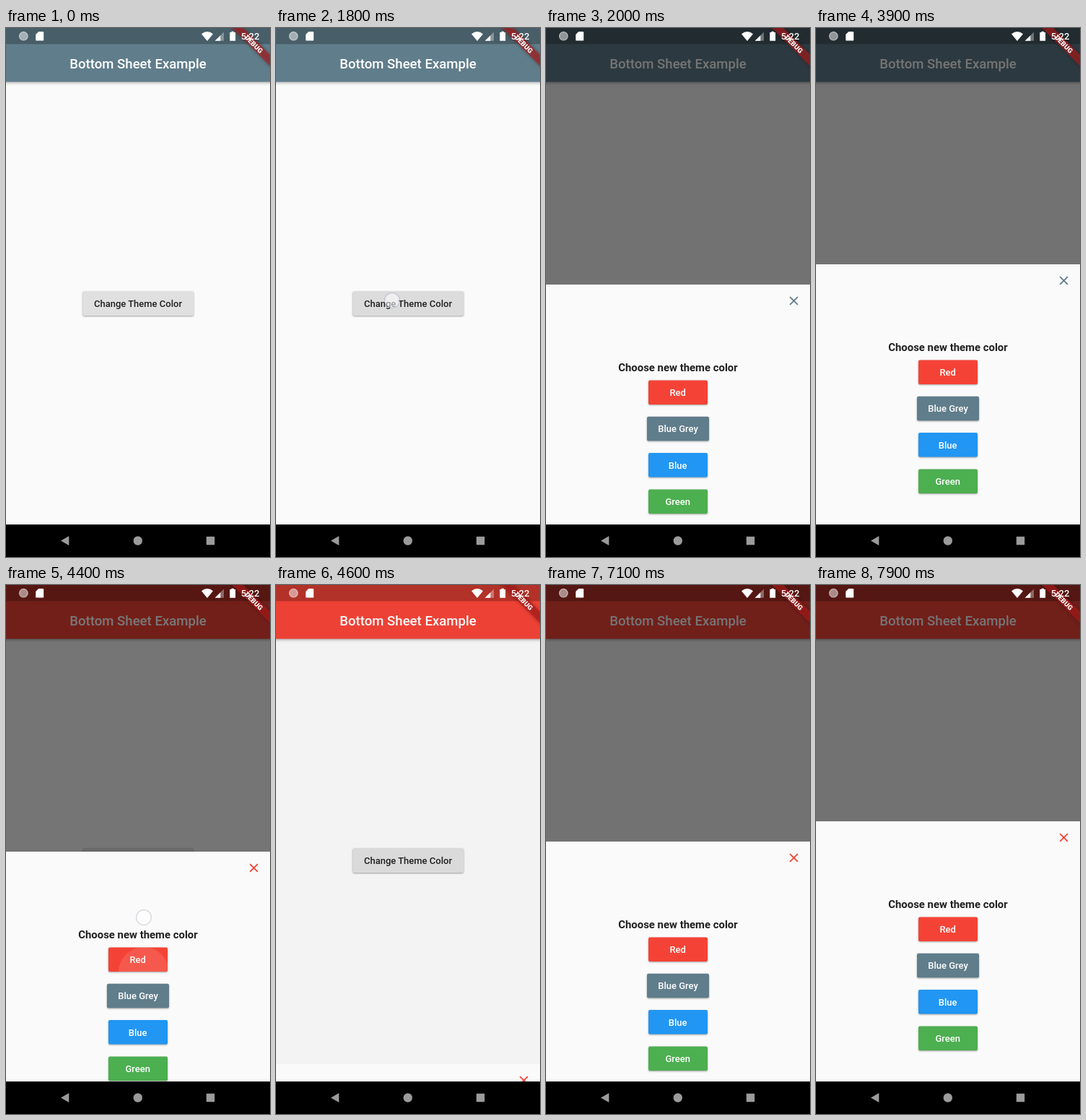
Recreate the animation shown at these times as an HTML page. Size 366 by 732 pixels, loop 8000 ms.

```html
<!DOCTYPE html>
<html lang="en">
<head>
<meta charset="utf-8">
<title>Bottom Sheet Example</title>
<style>
  html, body { margin: 0; width: 100%; height: 100%; overflow: hidden; background: #000; }

  #phone {
    display: block;
    width: 366px;
    height: 732px;
    font: 500 13px Roboto, sans-serif;
    text-anchor: middle;
    animation: demo 8s step-end infinite;
  }

  @keyframes demo {
    0%     { --theme: #607d8b; --drop: 360px; --dim: 0; --tap: 0; --x: 161px; --y: 377px; --button: #e0e0e0; --lift: 2px; --ripple: 0; }
    20%    { --tap: 1; --button: #dcdcdc; }
    23.75% { --drop: 170px; --dim: .3; --tap: 0; --button: #d6d6d6; }
    25%    { --drop: 28px; --dim: .54; --button: #e0e0e0; }
    26.25% { --drop: 0px; }
    53.75% { --theme: #607d8b; --drop: 0px; --dim: .54; --tap: 1; --x: 191px; --y: 460px; --ripple: .06; }
    55%    { --theme: #f44336; --drop: 42px; --dim: .53; --ripple: .11; }
    56.25% { --drop: 222px; --dim: .23; --tap: 0; --ripple: .08; }
    57.5%  { --drop: 336px; --dim: .028; --button: #e0e0e0; --lift: 2px; --ripple: 0; }
    86.25% { --drop: 360px; --dim: 0; --tap: 1; --x: 161px; --y: 386px; --button: #d0d0d0; --lift: 4px; }
    87.5%  { --drop: 170px; --dim: .3; --tap: 0; }
    88.75% { --drop: 28px; --dim: .54; --button: #e0e0e0; --lift: 2px; }
    90%, 100% { --theme: #f44336; --drop: 0px; --dim: .54; --tap: 0; --x: 161px; --y: 386px; --button: #e0e0e0; --lift: 2px; --ripple: 0; }
  }

  .bar { fill: var(--theme); filter: drop-shadow(0 1px 2px rgba(0, 0, 0, .36)); }
  .title { font-size: 18.6px; fill: #fff; }
  .open { fill: var(--button); filter: drop-shadow(0 1px calc(var(--lift) / 2) rgba(0, 0, 0, .36)); }
  .ink { fill: #202020; }
  .barrier { opacity: var(--dim); }
  .sheet { transform: translateY(calc(327px + var(--drop))); }
  .heading { font-size: 14.9px; font-weight: 700; }
  .close { stroke: var(--theme); stroke-width: 1.8; }
  .choices { fill: #fff; }
  .choices rect { filter: drop-shadow(0 1px 1px rgba(0, 0, 0, .36)); }
  .ripple { opacity: var(--ripple); }
  .touch { opacity: var(--tap); transform: translate(var(--x), var(--y)); }
  .ribbon { filter: drop-shadow(0 0 2.5px rgba(0, 0, 0, .5)); }
  .debug { font-size: 9.5px; font-weight: 900; }
</style>
</head>
<body>
<svg id="phone" viewBox="0 0 366 732">
  <defs>
    <clipPath id="redShape"><rect x="142" y="132.5" width="82" height="33.5" rx="2"/></clipPath>
  </defs>

  <rect width="366" height="732" fill="#fafafa"/>
  <rect class="bar" x="-5" y="-5" width="376" height="79.5"/>
  <rect width="366" height="22.3" fill="#000" opacity=".25"/>
  <text class="title" x="183" y="55.6">Bottom Sheet Example</text>

  <rect class="open" x="106.5" y="364.3" width="153.5" height="33.7" rx="2"/>
  <text class="ink" x="183" y="385.6">Change Theme Color</text>

  <rect class="barrier" width="366" height="732"/>

  <g class="sheet">
    <rect width="366" height="420" fill="#fafafa"/>
    <path class="close" d="M338.2 17.1l10.8 10.8m0-10.8l-10.8 10.8"/>
    <text class="heading ink" x="183" y="120.3">Choose new theme color</text>
    <g class="choices">
      <rect x="142" y="132.5" width="82" height="33.5" rx="2" fill="#f44336"/>
      <circle class="ripple" cx="191" cy="167" r="35" clip-path="url(#redShape)"/>
      <text x="182.7" y="154">Red</text>
      <rect x="140" y="182.8" width="86" height="33.5" rx="2" fill="#607d8b"/>
      <text x="183" y="204.3">Blue Grey</text>
      <rect x="142" y="233.1" width="82" height="33.5" rx="2" fill="#2196f3"/>
      <text x="182.7" y="254.6">Blue</text>
      <rect x="142" y="283.4" width="82" height="33.5" rx="2" fill="#4caf50"/>
      <text x="182.7" y="304.9">Green</text>
    </g>
  </g>

  <g transform="translate(366 0) rotate(45)">
    <rect class="ribbon" x="-44" y="26" width="88" height="11.2" fill="#b71c1c" fill-opacity=".63"/>
    <text class="debug" y="35" fill="#fff">DEBUG</text>
  </g>

  <g fill="#fff">
    <circle cx="24.3" cy="11.2" r="5.8" fill-opacity=".5" stroke="#fff" stroke-opacity=".55" stroke-width="1.2"/>
    <path d="M45.2 5H51a1.2 1.2 0 0 1 1.2 1.2v10.2a1.2 1.2 0 0 1-1.2 1.2h-8.6a1.2 1.2 0 0 1-1.2-1.2V9z"/>
    <path d="M271 8.2Q279 2 287 8.2L279 18z"/>
    <path d="M302 5.5V17.8H289.7z" fill-opacity=".35"/>
    <path d="M297.3 10.2V17.8H289.7z"/>
    <path d="M312.5 4.8h3.4v1.3h2.2v11.7h-7.8V6.1h2.2z"/>
    <text x="338.6" y="16.4">5:22</text>
  </g>

  <rect y="687" width="366" height="45"/>
  <g fill="#9b9b9b">
    <path d="M76 709.5l11.3-6.4v12.8z"/>
    <circle cx="182.8" cy="709.5" r="6.2"/>
    <rect x="277.8" y="703.8" width="11.4" height="11.4" rx=".6"/>
  </g>

  <circle class="touch" r="10.4" fill="#fff" fill-opacity=".55" stroke="#8490aa" stroke-opacity=".32" stroke-width="1.3"/>
</svg>
</body>
</html>
```
